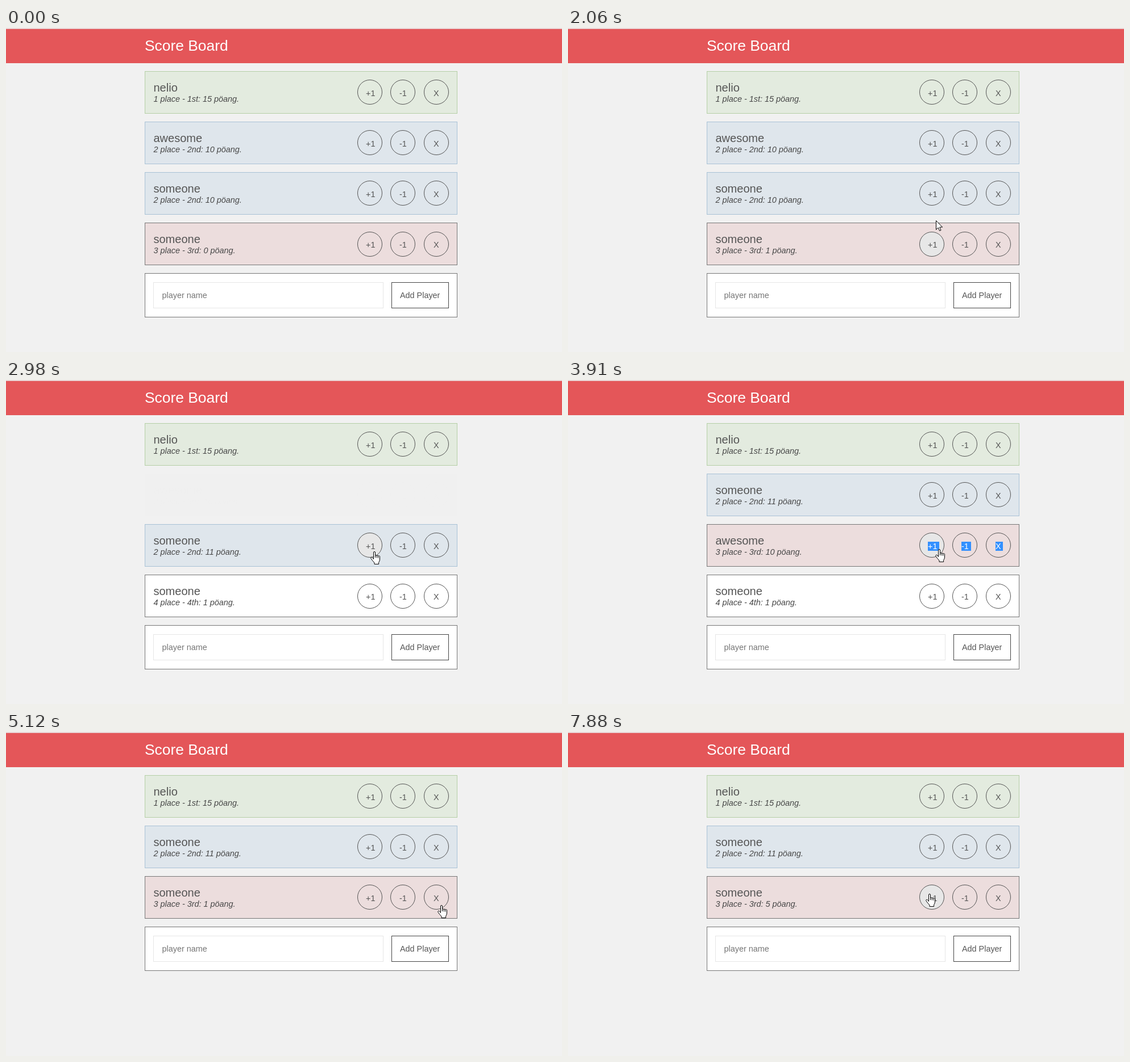
Recreate the animation shown at these times as an HTML page. Size 978 by 571 pixels, loop 8 s.

```html
<!DOCTYPE html>
<html lang="en">
<head>
<meta charset="utf-8">
<title>Score Board</title>
<style>
html, body { margin: 0; width: 100%; height: 100%; overflow: hidden; background: #f1f1f1; }
svg { display: block; font: 14.4px "Liberation Sans", Arial, sans-serif; fill: #555; }
text { white-space: pre; }
.title { font-size: 26.4px; fill: #fff; }
.name { font-size: 20px; }
.info { font-style: italic; fill: #484848; }
.box { fill: #fff; stroke: #777; }
.rank1 .box { fill: #e3ebdf; stroke: #b5cfa6; }
.rank2 .box { fill: #dfe6ec; stroke: #a9c2d6; }
.rank3 .box { fill: #ecdddd; }
.btn circle { fill: none; stroke: #555; }
.btn rect { fill: none; }
.focus circle { fill: #e7e7e7; }
.press { transform: scale(1.08); }
.press circle { fill: #c9c9c9; stroke: #858585; stroke-width: 1.7px; }
.press text { fill: #6c6c6c; }
.sel rect { fill: #3390ff; }
.sel text { fill: #fff; }
.field { fill: #fff; stroke: #e6e6e6; }
.add { fill: #fff; stroke: #444; }
.hint { fill: #757575; }
#cursor path { fill: #fff; stroke: #000; stroke-linejoin: round; }
</style>
</head>
<body>
<svg width="978" height="571" viewBox="0 0 978 571">
  <rect y="1" width="978" height="1" fill="#dfa9aa"/>
  <rect y="2" width="978" height="60" fill="#e45659"/>
  <text class="title" x="244" y="40">Score Board</text>
  <g id="rows"></g>
  <g id="form">
    <rect class="box" x="244.5" y=".5" width="549" height="77"/>
    <rect class="field" x="259.5" y="16.5" width="404" height="45"/>
    <text class="hint" x="274.5" y="44">player name</text>
    <rect class="add" x="678.5" y="16.5" width="100" height="45"/>
    <text x="693" y="44">Add Player</text>
  </g>
  <g id="cursor">
    <path id="arrow" d="M.5 .5V16.3L4.2 12.9L6.6 18.4L9 17.4L6.7 12H11.6Z"/>
    <path id="hand" d="M-.5 13.5V2A1.5 1.5 0 0 1 2.5 2V7.6A1.4 1.4 0 0 1 5.2 8A1.4 1.4 0 0 1 7.9 8.6A1.4 1.4 0 0 1 10.5 9.8V14Q10.5 17 8.6 19.5V22.5H1V20Q-2 17-5 12.6Q-5.8 11-4.5 10.4Q-3 10-2 11.5ZM2.5 7.6V11M5.2 8V11.4M7.9 8.6V11.8"/>
  </g>
</svg>
<script>
const LOOP = 8000, TOP = 76, PITCH = 89;
const SUFFIX = ['', 'st', 'nd', 'rd', 'th'];
const BUTTONS = [
  { label: '+1', cx: 640, x: -7, w: 20 },
  { label: '-1', cx: 698, x: -6, w: 17 },
  { label: 'X', cx: 757, x: -5, w: 13 }
];
const SWAP = 2690, DROP = 4690, FADE = 300;
const $ = id => document.getElementById(id);
const within = (t, a, b) => t >= a && t < b;
const swing = p => 0.5 - Math.cos(Math.PI * Math.min(1, Math.max(0, p))) / 2;

// Cursor moves: first step, last step, step count, points passed
const START = [780, 499];
const MOVES = [
  [120, 520, 6, [[688, 377]]],
  [740, 990, 4, [[643, 380]]],
  [1910, 2360, 7, [[645, 366], [646, 352], [647, 339], [651, 318], [653, 298], [651, 288], [647, 302]]],
  [3910, 4210, 5, [[652, 298], [680, 289], [715, 288], [750, 298], [766, 305]]],
  [4370, 4370, 1, [[765, 305]]],
  [5210, 5350, 3, [[672, 260]]],
  [5430, 5650, 4, [[655, 311]]],
  [6040, 6340, 5, [[684, 300], [706, 288], [668, 270], [625, 279], [635, 285]]]
];

function cursorAt(t) {
  let at = START;
  for (const [from, to, n, points] of MOVES) {
    if (t < from) break;
    const gap = n > 1 ? (to - from) / (n - 1) : 1;
    const step = Math.min(n, 1 + Math.floor((t - from) / gap + 0.05));
    const path = [at, ...points];
    const u = step / n * points.length;
    const i = Math.min(points.length - 1, Math.floor(u + 1e-6));
    const [a, b] = [path[i], path[i + 1]];
    at = [0, 1].map(k => Math.round(a[k] + (b[k] - a[k]) * (u - i)));
  }
  return at;
}

function playersAt(t) {
  const swapped = t >= SWAP, moved = t >= SWAP + FADE;
  const dropped = t >= DROP, gone = t >= DROP + FADE;
  const score = [1450, 6730, 6880, 7200, 7730].filter(s => t >= s).length;
  const pressing = [[1360, 1530], [6650, 6970], [7130, 7270], [7580, 7880]].some(([a, b]) => within(t, a, b));
  const second = {
    name: 'awesome', score: 10, rank: swapped ? 3 : 2, slot: moved ? 2 : 1,
    alpha: dropped ? 1 - swing((t - DROP) / FADE)
      : moved ? swing((t - SWAP - FADE) / FADE)
      : 1 - swing((t - SWAP) / FADE),
    focus: within(t, 3060, 4600) ? 0 : t >= 4770 ? 2 : -1,
    press: within(t, 4600, 4770) ? 2 : -1,
    sel: within(t, 3060, 4600),
    hidden: gone
  };
  return [
    { name: 'nelio', score: 15, rank: 1, slot: 0 },
    second,
    { name: 'someone', score: swapped ? 11 : 10, rank: 2, slot: moved ? 1 : 2,
      focus: within(t, 2820, 3060) ? 0 : -1, press: within(t, 2660, 2820) ? 0 : -1 },
    { name: 'someone', score, rank: swapped && !dropped ? 4 : 3, slot: gone ? 2 : 3,
      focus: within(t, 1530, 2660) || t >= 6970 ? 0 : -1, press: pressing ? 0 : -1 }
  ];
}

const button = b => `<g transform="translate(${b.cx} 37)"><g class="btn">
  <circle r="21.5"/><rect x="${b.x}" y="-6" width="${b.w}" height="16"/>
  <text x="${b.x}" y="7">${b.label}</text></g></g>`;

$('rows').innerHTML = `<g><rect class="box" x="244.5" y=".5" width="549" height="74"/>
  <text class="name" x="259.5" y="36"></text><text class="info" x="259.5" y="54"></text>
  ${BUTTONS.map(button).join('')}</g>`.repeat(4);

const rows = [...$('rows').children].map(el => ({
  el,
  name: el.querySelector('.name'),
  info: el.querySelector('.info'),
  btns: [...el.querySelectorAll('.btn')]
}));

function drawRow(row, p) {
  const { el, name, info, btns } = row;
  el.setAttribute('class', 'rank' + p.rank);
  el.setAttribute('transform', `translate(0 ${TOP + PITCH * p.slot})`);
  el.setAttribute('opacity', p.alpha ?? 1);
  el.style.display = p.hidden ? 'none' : '';
  name.textContent = p.name;
  info.textContent = `${p.rank} place - ${p.rank}${SUFFIX[p.rank]}: ${p.score} pöang.`;
  btns.forEach((b, i) => {
    b.setAttribute('class', 'btn' + (p.press === i ? ' press' : p.focus === i ? ' focus' : '') + (p.sel ? ' sel' : ''));
    b.firstElementChild.setAttribute('cy', p.slot === 3 ? 1 : 0);
  });
}

function draw(t) {
  const players = playersAt(t);
  players.forEach((p, i) => drawRow(rows[i], p));
  const shown = players.filter(p => !p.hidden).length;
  const formY = TOP + PITCH * shown;
  $('form').setAttribute('transform', `translate(0 ${formY})`);

  const [x, y] = cursorAt(t);
  const onAdd = within(x, 678, 779) && within(y, formY + 16, formY + 62);
  const onButton = players.some(p => !p.hidden && BUTTONS.some(b =>
    Math.hypot(x - b.cx, y - (TOP + PITCH * p.slot + 37)) <= 22));
  const hand = onAdd || onButton;
  $('cursor').setAttribute('transform', `translate(${x} ${y})`);
  $('cursor').style.display = t < MOVES[0][0] ? 'none' : '';
  $('hand').style.display = hand ? '' : 'none';
  $('arrow').style.display = hand ? 'none' : '';
}

const begin = performance.now();
function tick() {
  draw((performance.now() - begin) % LOOP);
  requestAnimationFrame(tick);
}
tick();
</script>
</body>
</html>
```
